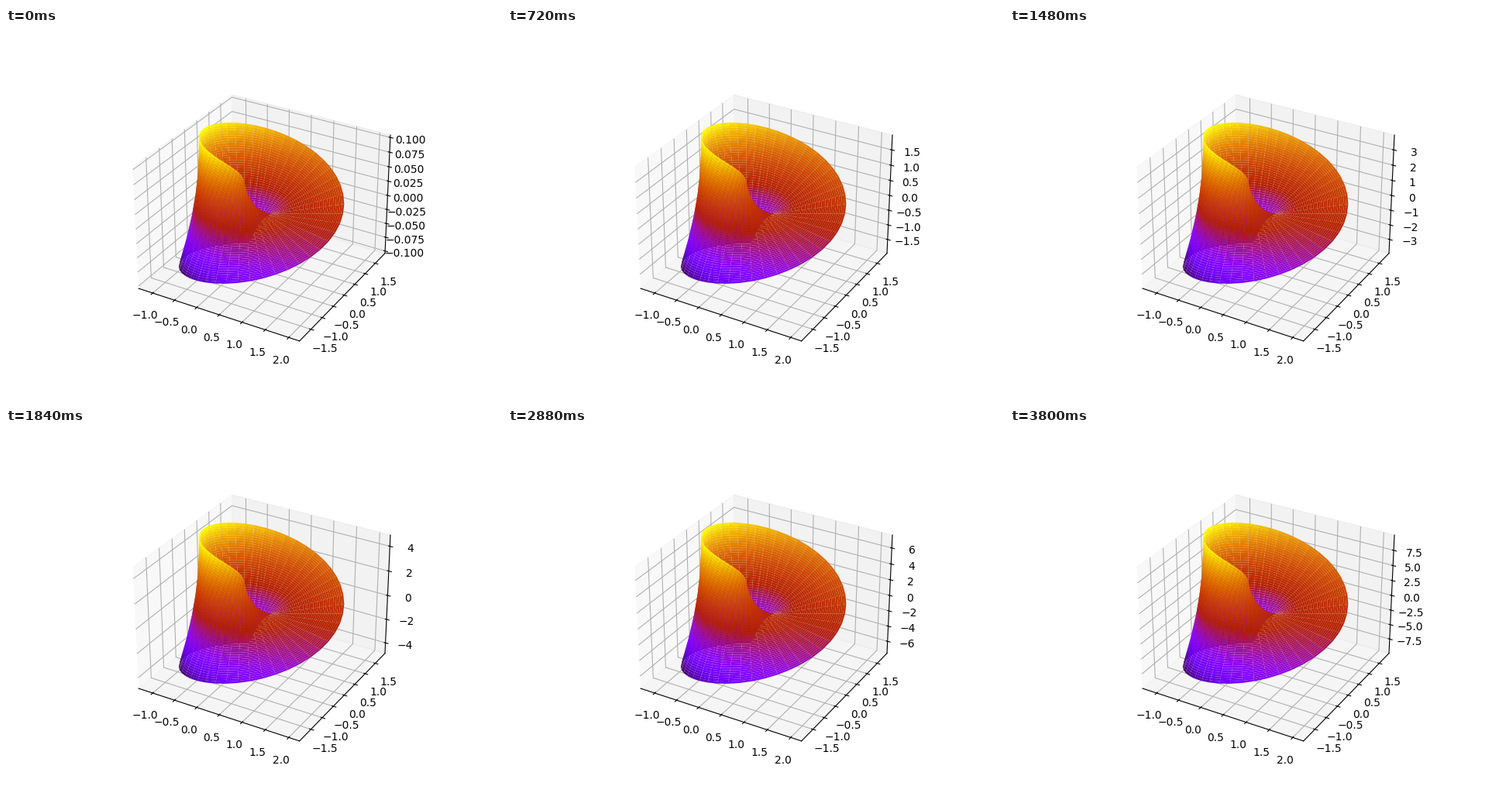
Animation, 640 px wide and 480 px high, one loop 3840 ms. Source, as a matplotlib script:

```python
import numpy as np
import matplotlib.pyplot as plt
from matplotlib.animation import FuncAnimation
from matplotlib.ticker import MaxNLocator

FRAMES, INTERVAL = 96, 40

fig = plt.figure(figsize=(6.4, 4.8), dpi=100)
ax = fig.add_subplot(projection="3d")

# Moebius strip; its height always fills the z axis, so only the z scale changes.
u, w = np.meshgrid(np.linspace(0, 2 * np.pi, 50), np.linspace(-1, 1, 50))
r = 1 + w * np.cos(u / 2)
z = w * np.sin(u / 2)
ax.plot_surface(r * np.cos(u), r * np.sin(u), z / z.max(), cmap="gnuplot")

locator = MaxNLocator(nbins=8, steps=[1, 2, 2.5, 5, 10])


def tick_labels(ticks):
    step = ticks[1] - ticks[0]
    digits = next(d for d in range(6) if abs(round(step, d) - step) < 1e-9)
    return [f"{t + 0.0:.{digits}f}".replace("-", "\u2212") for t in ticks]


def update(frame):
    height = 0.1 * (frame + 1)
    ticks = locator.tick_values(-height, height)
    ticks = ticks[np.abs(ticks) <= height + 1e-9]
    ax.set_zticks(ticks / height, tick_labels(ticks))
    return []


anim = FuncAnimation(fig, update, frames=FRAMES, interval=INTERVAL,
                     repeat=True, repeat_delay=0, blit=False)
plt.show()
```
